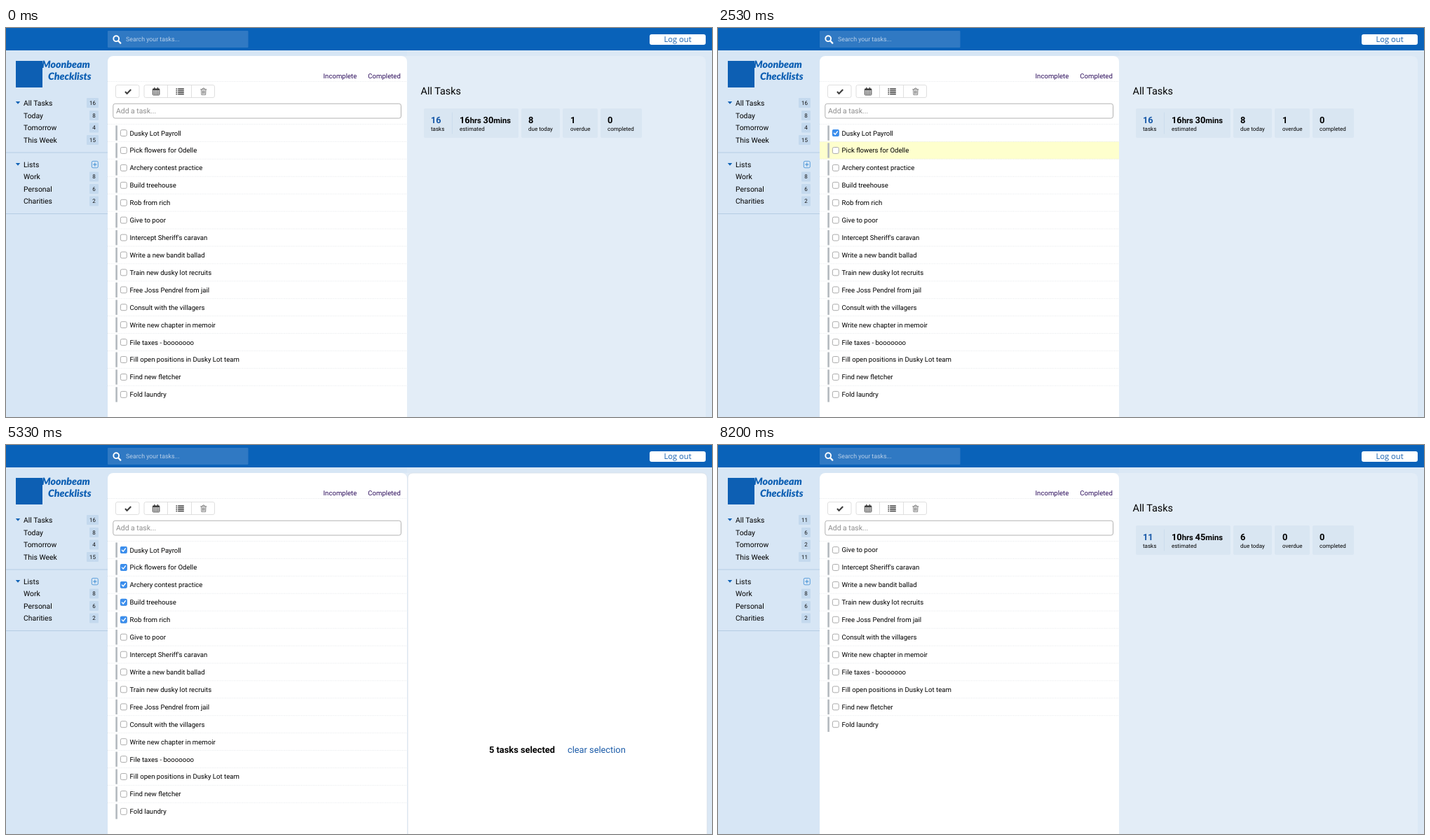
An HTML page for the animation above (8270 ms loop, 1007x556 px).

```html
<!DOCTYPE html>
<html lang="en">
<head>
<meta charset="utf-8">
<title>Task list</title>
<style>
  html, body { margin: 0; width: 100%; height: 100%; overflow: hidden; background: #d7e6f5; }
  svg { display: block; font-family: Roboto, sans-serif; text-rendering: geometricPrecision; }
  text { white-space: pre; }
  .brand { font: italic 900 14.2px Lato, sans-serif; fill: #0d5fb3; }
  .bold { font-weight: 700; }
  .line { fill: none; stroke-linecap: round; stroke-linejoin: round; }
</style>
</head>
<body>
<svg id="stage" width="1007" height="556"></svg>
<script>
const LOOP = 8270, PITCH = 24.92, SLIDE = 400;
const OPEN_AT = 2640, DONE_AT = 6090;
const PANEL_TRAVEL = 434;
const checkTimes = [1900, OPEN_AT, 3250, 3900, 4550];
const hovers = [
  [0, -1], [1100, 0], [2200, 1], [2850, 2], [3500, 3], [4150, 4],
  [5000, 3], [5060, 2], [5130, 1], [5200, 0], [5270, -1]
];
const tasks = [
  'Dusky Lot Payroll', 'Pick flowers for Odelle', 'Archery contest practice',
  'Build treehouse', 'Rob from rich', 'Give to poor', "Intercept Sheriff's caravan",
  'Write a new bandit ballad', 'Train new dusky lot recruits', 'Free Joss Pendrel from jail',
  'Consult with the villagers', 'Write new chapter in memoir', 'File taxes - booooooo',
  'Fill open positions in Dusky Lot team', 'Find new fletcher', 'Fold laundry'
];
// label, centre y, count before, count after
const sidebar = [
  ['All Tasks', 107, 16, 11], ['Today', 125, 8, 6], ['Tomorrow', 142.5, 4, 2],
  ['This Week', 160, 15, 11], ['Lists', 195], ['Work', 212.5, 8, 8],
  ['Personal', 230, 6, 6], ['Charities', 247.5, 2, 2]
];
// card x, card width, text x, label, value before, value after
const small = s => `<tspan font-size="11.2">${s}</tspan>`;
const duration = (h, m) => h + small('hrs ') + m + small('mins');
const stats = [
  [596, 135, 606, 'tasks', 16, 11],
  [0, 0, 647, 'estimated', duration(16, 30), duration(10, 45)],
  [735, 55, 745, 'due today', 8, 6],
  [794, 50, 805, 'overdue', 1, 0],
  [848, 59, 858, 'completed', 0, 0]
];

const rect = (x, y, w, h, fill, more = '') =>
  `<rect x="${x}" y="${y}" width="${w}" height="${h}" fill="${fill}" ${more}/>`;
// Text is placed by the middle of its capitals.
const text = (x, mid, size, str, more = '') =>
  `<text x="${x}" y="${mid + size * 0.355}" font-size="${size}" ${more}>${str}</text>`;
const path = (d, stroke, width = 1, more = '') =>
  `<path class="line" d="${d}" stroke="${stroke}" stroke-width="${width}" ${more}/>`;
const dotted = y => path(`M145 ${y}H572`, '#dfe3e6', 0.8, 'stroke-dasharray="1 1.4" style="stroke-linecap:butt"');
const swap = (before, after, draw) =>
  before === after ? draw(before)
    : `<g class="before">${draw(before)}</g><g class="after">${draw(after)}</g>`;

function header() {
  return rect(0, 0, 1007, 32, '#0962b9') + rect(145, 4, 200.5, 24, '#3079c3', 'rx="1"') +
    '<circle cx="157.2" cy="15.2" r="3.9" fill="none" stroke="#fff" stroke-width="1.9"/>' +
    path('M160.3 18.5L163.3 21.6', '#fff', 2.3) +
    text(171, 16.2, 8.8, 'Search your tasks...', 'fill="#b9d0e9"') +
    rect(918, 9, 80, 15, '#fff', 'rx="3"') +
    text(958, 16.4, 11.2, 'Log out', 'text-anchor="middle" fill="#1660b0" style="font-family:\'Open Sans\',sans-serif"');
}

function badge(n, y) {
  const w = n > 9 ? 17 : 13;
  return rect(132 - w, y - 7, w, 14, '#c4d9ee', 'rx="1"') +
    text(132 - w / 2, y + 0.1, 8, n, 'text-anchor="middle" fill="#111"');
}

function sidebarView() {
  let out = rect(14, 47, 38, 38, '#0d5fb3') +
    '<text class="brand" x="51" y="57">Moonbeam</text><text class="brand" x="60" y="74">Checklists</text>';
  for (const [label, y, before, after] of sidebar) {
    out += text(25, y, 10.4, label);
    if (before !== undefined) out += swap(before, after, n => badge(n, y));
  }
  for (const y of [107, 195]) out += `<path d="M13.8 ${y - 2}h6.4l-3.2 3.8z" fill="#0f62b5"/>`;
  return out + path('M0 178H145M0 265.5H145', '#b5cde4') +
    rect(122.3, 190.4, 9, 9.4, 'none', 'rx="1.8" stroke="#5a9edb"') +
    path('M124.6 195.1h4.4M126.8 192.9v4.4', '#3f8dd3');
}

function toolbar() {
  const ink = '#3f3f3f', frame = 'rx="2.5" stroke="#dcdcdc" stroke-width="0.9"';
  let out = rect(156.5, 81.5, 33.5, 18, '#fff', frame) + rect(197, 81.5, 100.5, 18, '#fff', frame) +
    path('M230.5 81.5v18M264.5 81.5v18', '#dcdcdc', 0.9) +
    path('M170 91l2.6 2.7L178.2 88', ink, 2.2, 'style="stroke-linecap:butt;stroke-linejoin:miter"') +
    rect(209.3, 87, 9.6, 8.8, 'none', `rx="0.8" stroke="${ink}" stroke-width="0.9"`) +
    rect(209.3, 86.8, 9.6, 2.4, ink) + path('M211.8 85.4v2M216.4 85.4v2', ink, 1.4) +
    path('M209.5 91.4h9.2M209.5 93.6h9.2M211.8 89v6.6M214.1 89v6.6M216.4 89v6.6', ink, 0.6);
  for (let i = 0; i < 4; i++) out += rect(242.5, 86.3 + i * 2.5, 1.6, 1.5, ink) + rect(245.2, 86.3 + i * 2.5, 8.6, 1.5, ink);
  return out + path('M277.7 87.8h8.2M280.2 87.5l.6-1.5h2l.6 1.5M278.6 88l.3 7.4h5.8l.3-7.4M280.4 89.7v4M281.8 89.7v4M283.2 89.7v4', '#666', 0.8);
}

function taskRow(name, i) {
  const y = 150 + i * PITCH, mark = i < checkTimes.length;
  return `<g class="task">` + dotted(y - 12.5) +
    rect(156.3, y - 10.6, 2.6, 21.4, '#b4babf') +
    rect(163.4, y - 4.4, 8.9, 8.9, '#fff', 'rx="2" stroke="#a2a2a2" stroke-width="0.9"') +
    (mark ? '<g class="check">' + rect(162.9, y - 4.9, 9.9, 9.9, '#3b8eed', 'rx="2"') +
      path(`M165.4 ${y + 0.2}l1.8 2 3.2-4.3`, '#fff', 1.4) + '</g>' : '') +
    text(176.5, y + 0.1, 9.6, name) + '</g>';
}

function listView() {
  return '<path d="M145 556V48a8 8 0 0 1 8-8H564a8 8 0 0 1 8 8V556z" fill="#fff"/>' +
    text(452.5, 69, 9.6, 'Incomplete', 'fill="#2c0d5c"') + text(516.3, 69, 9.6, 'Completed', 'fill="#2c0d5c"') +
    dotted(76.5) + toolbar() +
    rect(152.8, 108.2, 410.7, 20.8, '#fff', 'rx="3" stroke="#b3b3b3"') +
    text(157, 118.6, 10.4, 'Add a task...', 'fill="#8c8c8c"') +
    rect(145, 137.5, 427, PITCH, '#feffcd', 'id="hover"') +
    tasks.map(taskRow).join('');
}

function summary() {
  let out = '<path d="M564 556V40H990a8 8 0 0 1 8 8V556z" fill="#e3edf7"/>' + text(591.5, 90, 14.4, 'All Tasks');
  for (const [x, w] of stats) if (w) out += rect(x, 115, w, 42, '#d9e6f2', 'rx="2"');
  out += path('M636.5 121V151', '#cbdcec', 0.9);
  stats.forEach(([, , x, label, before, after], i) => {
    const color = i ? '#000' : '#1758a8';
    out += swap(before, after, v => text(x, 131, 12.8, v, `class="bold" fill="${color}"`)) +
      text(x, 144.5, 8, label);
  });
  return out;
}

function selectionPanel() {
  return '<g id="panel">' + rect(573, 40, 427, 540, '#fff', 'rx="7" stroke="#d5dee7" stroke-width="0.8"') +
    '<g id="message">' + text(689, 435, 12.8, '', 'class="bold" id="count"') +
    text(801, 435, 12.8, 'clear selection', 'fill="#1b5ba8"') + '</g></g>';
}

const stage = document.getElementById('stage');
stage.innerHTML = rect(0, 0, 1007, 556, '#d7e6f5') + rect(572, 32, 435, 524, '#dbe8f5') +
  sidebarView() + summary() + listView() + selectionPanel() + header();

const byId = id => document.getElementById(id);
const all = selector => [...stage.querySelectorAll(selector)];
const panel = byId('panel'), message = byId('message'), count = byId('count'), hover = byId('hover');
const rows = all('.task'), checks = all('.check'), before = all('.before'), after = all('.after');
const show = (el, on) => el.setAttribute('visibility', on ? 'visible' : 'hidden');
const swing = p => 0.5 - Math.cos(Math.PI * Math.min(1, Math.max(0, p))) / 2;

function render(t) {
  const done = t >= DONE_AT;
  before.forEach(el => show(el, !done));
  after.forEach(el => show(el, done));

  const removed = done ? checkTimes.length : 0;
  rows.forEach((row, i) => {
    row.setAttribute('display', i < removed ? 'none' : 'inline');
    row.setAttribute('transform', `translate(0 ${-removed * PITCH})`);
  });
  checks.forEach((el, i) => show(el, t >= checkTimes[i]));

  const hovered = hovers.filter(([at]) => at <= t).pop()[1];
  show(hover, hovered >= 0);
  hover.setAttribute('y', 137.5 + Math.max(0, hovered) * PITCH);

  const shown = swing((t - OPEN_AT) / SLIDE) - swing((t - DONE_AT) / SLIDE);
  const settled = t >= OPEN_AT + SLIDE && !done;
  show(panel, shown > 0);
  panel.setAttribute('transform', `translate(${(1 - shown) * PANEL_TRAVEL} 0)`);
  message.setAttribute('transform', `translate(0 ${settled ? 0 : -6})`);
  count.textContent = (done ? 0 : checkTimes.filter(at => at <= t).length) + ' tasks selected';
}

const start = performance.now();
function tick() {
  render((performance.now() - start) % LOOP);
  requestAnimationFrame(tick);
}
tick();
</script>
</body>
</html>
```
